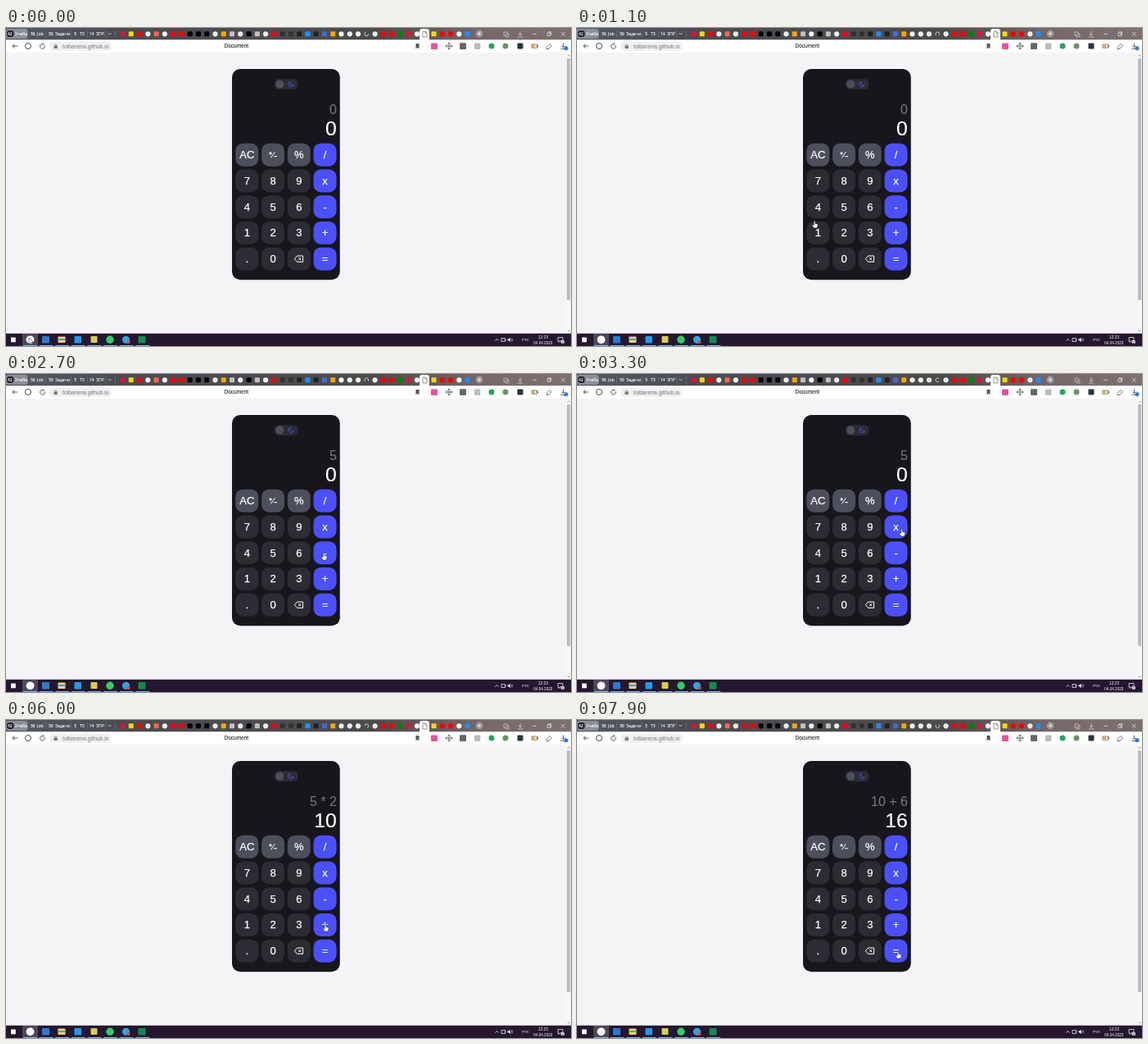
An HTML page with a canvas for the animation above (8 s loop, 690 by 388 pixels).

```html
<!DOCTYPE html>
<html lang="ru">
<head>
<meta charset="utf-8">
<title>Document</title>
<style>
html, body { margin: 0; width: 100%; height: 100%; overflow: hidden; background: #f4f3f6; }
canvas { display: block; width: 690px; height: 388px; }
</style>
</head>
<body>
<canvas id="stage"></canvas>
<script>
const W = 690, H = 388, LOOP = 8000, STEP = 100;
const canvas = document.getElementById('stage');
const ratio = window.devicePixelRatio || 1;
canvas.width = W * ratio;
canvas.height = H * ratio;
const ctx = canvas.getContext('2d');
const ARIAL = '"Liberation Sans", Arial, sans-serif';
const UI = '"Open Sans", "Noto Sans", sans-serif';

const stripFill = ctx.createLinearGradient(0, 0, W, 0);
stripFill.addColorStop(0, '#545966');
stripFill.addColorStop(0.2, '#4b4c52');
stripFill.addColorStop(0.65, '#4d4a4c');
stripFill.addColorStop(0.85, '#77696a');
stripFill.addColorStop(1, '#7d7070');

function box(x, y, w, h, color, r = 0) {
  ctx.fillStyle = color;
  ctx.beginPath();
  ctx.roundRect(x, y, w, h, r);
  ctx.fill();
}

function dot(x, y, r, color) {
  ctx.fillStyle = color;
  ctx.beginPath();
  ctx.arc(x, y, r, 0, Math.PI * 2);
  ctx.fill();
}

function ring(x, y, r, color, from = 0, to = Math.PI * 2, width = 0.8) {
  ctx.strokeStyle = color;
  ctx.lineWidth = width;
  ctx.beginPath();
  ctx.arc(x, y, r, from, to);
  ctx.stroke();
}

function stroke(path, color, width = 0.8) {
  ctx.strokeStyle = color;
  ctx.lineWidth = width;
  ctx.stroke(new Path2D(path));
}

// A thin outline in the same colour gives the text a little more weight.
function text(s, x, y, size, color, align = 'left', font = ARIAL, weight = 0) {
  ctx.font = `${size}px ${font}`;
  ctx.fillStyle = ctx.strokeStyle = color;
  ctx.textAlign = align;
  ctx.fillText(s, x, y);
  if (weight) {
    ctx.lineWidth = weight;
    ctx.strokeText(s, x, y);
  }
}

// Tab strip

const groups = [
  ['42', 2, 'Учеба', 11], ['36', 30, 'Job', 38], ['30', 52, 'Задачи', 60],
  ['3', 83, 'ТЗ', 90], ['14', 102, 'ЗПР', 110]
];
const icons = ('crimson gold red white tomato white red red black black black white ' +
  'orange silver white black silver white red #333 #333 #222 dodgerblue #222 ' +
  'royalblue orange white white white - white red red green crimson white - ' +
  'gold red red white dodgerblue').split(' ');

function drawTabs(t) {
  box(0, 0, W, 14.5, stripFill);
  box(0, 1, 26.5, 12, '#8b8f99', 3);
  for (const x of [48, 79, 99, 121]) box(x, 3, 0.6, 8, '#777b86');
  box(1, 3, 8.5, 8, '#242428', 3);
  for (const [count, cx, name, nx] of groups) {
    text(count, cx, 9, 4.9, '#fff', 'left', UI, 0.15);
    text(name, nx, 9.2, 5.2, '#fff', 'left', UI, 0.1);
  }
  stroke('M124.5 6 l2 2 l2 -2', '#ddd');
  box(133, 3, 0.6, 8, '#777b86');

  box(505, 1, 12, 14, '#fff', [3, 3, 0, 0]);
  icons.forEach((color, i) => {
    const x = 142.5 + i * 10.27;
    if (color === '-') return;
    if (color === 'white') dot(x, 7.3, 3.1, '#f2f2f4');
    else box(x - 3, 4.2, 6, 6, color, 1);
  });
  const turn = t / 800 * Math.PI * 2;
  ring(440.3, 7.3, 2.4, '#eee', turn, turn + 4.5);
  stroke('M509 4 h3 l2 2 v5 h-5 z M512 4 v2 h2', '#555', 0.6);

  dot(578, 7, 4.4, '#a09a9c');
  stroke('M576 7 h4 M578 5 v4', '#fff');
  stroke('M608 5 h4 v4 h-4 z M610 9 v2 h4 v-4 h-2', '#ddd', 0.6);
  stroke('M628 4 v5 M626 7 l2 2 l2 -2 M625 11 h6', '#ddd', 0.7);
  stroke('M643 7.3 h5 M661 6 h3.5 v3.5 h-3.5 z M662.2 6 v-1.2 h3.5 v3.5 h-1.2', '#eee', 0.7);
  stroke('M678 5 l4.6 4.6 M682.6 5 l-4.6 4.6', '#eee', 0.7);
}

function drawAddressBar() {
  box(0, 14.5, W, 15.5, '#fff');
  stroke('M14 22 h-6 M10.5 19.5 l-2.5 2.5 l2.5 2.5', '#444', 0.9);
  ring(27, 22, 3.5, '#444', 0, Math.PI * 2, 1);
  ring(44.5, 22.3, 2.9, '#444', -0.4, 4.9, 0.9);
  stroke('M45.2 18.2 l1 1.5 l-1.8 1', '#444');
  box(53.5, 16.5, 75, 11.5, '#f0f0f2', 4);
  box(58.5, 21.5, 4.4, 3.5, '#777', 0.6);
  ring(60.7, 21.4, 1.4, '#777', Math.PI, Math.PI * 2);
  text('tolbarena.github.io', 69, 24.5, 6.9, '#777');
  text('Document', 281.3, 24.4, 6.5, '#222', 'center', ARIAL, 0.1);

  ctx.fillStyle = '#555';
  ctx.fill(new Path2D('M500.5 19 h4 v6.5 l-2 -1.8 l-2 1.8 z'));
  box(519, 18.5, 8, 7.5, '#ed4f9c', 1);
  stroke('M537 22 h8 M541 18 v8 M538.5 20.5 l-1.7 1.5 l1.7 1.5 M543.5 20.5 l1.7 1.5 ' +
    'l-1.7 1.5 M539.5 19.7 l1.5 -1.7 l1.5 1.7 M539.5 24.3 l1.5 1.7 l1.5 -1.7', '#444', 0.8);
  box(554, 18.3, 8, 7.6, '#666', 1);
  box(572, 18.5, 7.4, 7.4, '#bbb', 1);
  dot(593, 22, 3.5, '#27a558');
  dot(610, 22, 3.5, '#67965c');
  box(624.5, 18.5, 7, 7, '#26343c', 1);
  stroke('M642 20 h6.5 v4.2 h-6.5 z', '#444', 0.7);
  box(642.5, 20.5, 3.5, 3.2, '#e9aa35');
  box(649, 21.2, 1, 1.8, '#444');
  stroke('M660 23.5 l4 -4 l2.3 2.3 l-4 4 z M659.5 25.5 h3', '#555', 0.8);
  stroke('M680.5 18.5 v5 M678.3 21.5 l2.2 2.2 l2.2 -2.2 M677.5 25.5 h5', '#444', 0.8);
  dot(684, 24.7, 2.5, '#2878e8');
}

// Taskbar

function drawTaskbar() {
  box(0, 372.8, W, 15.2, '#25172f');
  box(6, 377.5, 5.8, 5.8, '#fff');
  box(20, 373, 19, 15, '#50465a');
  dot(29.5, 380.3, 4.9, '#fff');
  box(44, 376, 9, 8.5, '#2b7bd3', 1);
  box(63.5, 376.5, 9, 7.5, '#f7d268', 0.8);
  box(63.5, 379, 9, 2, '#4a9bd8');
  box(83.5, 376, 8.5, 8.5, '#229be8', 1);
  box(103.5, 376, 8, 8, '#d9ce57', 1);
  dot(127, 380.3, 4.7, '#34ce64');
  dot(146.5, 380.3, 4.6, '#31a5df');
  dot(149.5, 383, 2.1, '#e44c3c');
  box(161.5, 376, 9, 8.5, '#168a50', 1);
  for (let i = 0; i < 8; i++) box(21 + i * 19.6, 387, 17, 1, '#76b9ed');

  stroke('M597.5 381.5 l2 -2 l2 2', '#fff');
  stroke('M605 378.5 h4.5 v4 h-4.5 z M610 379.5 v2', '#fff', 0.7);
  ctx.fillStyle = '#fff';
  ctx.fill(new Path2D('M612.5 379.5 h1.2 l2 -1.6 v5 l-2 -1.6 h-1.2 z'));
  ring(615.8, 380.4, 1.7, '#fff', -0.9, 0.9, 0.6);
  ring(615.8, 380.4, 3, '#aaa', -0.9, 0.9, 0.6);
  text('РУС', 634.5, 382.4, 4.4, '#fff', 'center');
  text('12:23', 655.8, 379, 4.9, '#fff', 'center');
  text('04.04.2023', 655.8, 386.2, 4.6, '#fff', 'center');
  stroke('M674 377.5 h6 v4.5 h-4 l-1 1.5 v-1.5 h-1 z', '#fff', 0.7);
  dot(679.8, 383, 2.3, '#ddd');
  text('2', 679.8, 384.6, 4, '#222', 'center');
}

// Calculator

const keys = ['AC', '±', '%', '/', '7', '8', '9', 'x', '4', '5', '6', '-',
  '1', '2', '3', '+', '.', '0', '⌫', '='];
const PITCH = 31.75, KEY = 28;

// [start, expression, result]
const states = [
  [0, '0', '0'], [1900, '5', '0'], [3500, '5 *', '0'], [4300, '5 * 2', '0'],
  [5200, '5 * 2', '10'], [6300, '10 +', '10'], [7000, '10 + 6', '10'], [7700, '10 + 6', '16']
];

function drawKey(label, i) {
  const col = i % 4, row = Math.floor(i / 4);
  const x = 280.3 + col * PITCH, y = 140.7 + row * PITCH;
  const color = col === 3 ? '#4b50fb' : row === 0 ? '#4e4f5c' : '#2c2c34';
  box(x, y, KEY, KEY, color, 9);
  const cx = x + KEY / 2, cy = y + KEY / 2;
  if (label === '±') {
    stroke(`M${cx - 5} ${cy - 1.8} h4 m-2 -2 v4 M${cx - 2.6} ${cy + 3.5} l5 -7 ` +
      `M${cx + 1} ${cy + 2} h4`, '#fff', 1);
  } else if (label === '⌫') {
    stroke(`M${cx - 5.4} ${cy} l3.2 -3.7 h7 v7.4 h-7 z ` +
      `M${cx - 0.7} ${cy - 1.6} l3.2 3.2 m0 -3.2 l-3.2 3.2`, '#fff', 1);
  } else {
    text(label, cx, cy + 4.5, 13, '#fff', 'center', ARIAL, 0.25);
  }
}

function drawCalculator(t) {
  box(276, 50, 131.8, 257.2, '#17161c', 10);
  box(328, 62.2, 28.3, 12.8, '#2c2c34', 5);
  dot(334.3, 68.6, 5, '#4e4f5c');
  stroke('M347 65.3 a3.3 3.3 0 1 0 4.2 4.3 a3.4 3.4 0 0 1 -4.2 -4.3 z', '#4b50fb', 0.9);
  const [, expr, result] = states.filter(s => s[0] <= t).pop();
  text(expr, 404, 105.3, 16, '#737277', 'right', ARIAL, 0.15);
  text(result, 403.8, 131.4, 24.8, '#fff', 'right', ARIAL, 0.2);
  keys.forEach(drawKey);
}

// Pointer: [time, x, y] of the tip

const path = [
  [0, 28, 378], [200, 28, 378], [1000, 290, 235], [1200, 290, 235], [1800, 327, 220],
  [2200, 327, 220], [2700, 388, 218], [2900, 388, 218], [3300, 396.5, 189],
  [3600, 396.5, 189], [4200, 329, 252], [4700, 329, 252], [5100, 391, 283],
  [5500, 391, 283], [5900, 390, 249], [6400, 390, 249], [6900, 359, 219],
  [7200, 359, 219], [7600, 392, 282], [LOOP, 392, 282]
];

function pointerAt(t) {
  const i = path.findIndex(p => p[0] > t);
  const [t0, x0, y0] = path[i - 1], [t1, x1, y1] = path[i];
  const k = (t - t0) / (t1 - t0), e = k * k * (3 - 2 * k);
  return [x0 + (x1 - x0) * e, y0 + (y1 - y0) * e];
}

function overKey(x, y) {
  const dx = x - 280.3, dy = y - 140.7;
  return dx >= 0 && dy >= 0 && dx < 4 * PITCH && dy < 5 * PITCH;
}

const hand = new Path2D('M-.8 .6 q.8 -1 1.6 0 v2.8 l2.6 .7 q.8 .3 .7 1.2 l-.5 2.7 l-.7 1 ' +
  'h-3.6 l-2.3 -3.2 q0 -1 1 -.8 l1.2 .8 z');
const arrow = new Path2D('M0 0 v7.6 l1.8 -1.6 l1.2 2.6 l1.2 -.6 l-1.2 -2.5 h2.4 z');

function drawPointer(t) {
  const [x, y] = pointerAt(t);
  const shape = overKey(x, y) ? hand : arrow;
  ctx.save();
  ctx.translate(x, y);
  ctx.fillStyle = '#fff';
  ctx.fill(shape);
  ctx.strokeStyle = '#111';
  ctx.lineWidth = 0.5;
  ctx.stroke(shape);
  ctx.restore();
}

function draw(now) {
  const t = Math.floor((now % LOOP) / STEP) * STEP;
  ctx.setTransform(ratio, 0, 0, ratio, 0, 0);
  ctx.lineJoin = 'round';
  box(0, 0, W, H, '#f4f3f6');
  drawTabs(t);
  drawAddressBar();
  box(684.5, 30, 5.5, 343, '#f7f7f8');
  box(685, 37, 4.2, 295, '#bdbdc0', 1);
  stroke('M685.8 34.5 l1.4 -1.6 l1.4 1.6 M685.8 368.5 l1.4 1.6 l1.4 -1.6', '#777', 0.7);
  drawCalculator(t);
  drawTaskbar();
  drawPointer(t);
}

const start = performance.now();
function tick() {
  draw(performance.now() - start);
  requestAnimationFrame(tick);
}
tick();
</script>
</body>
</html>
```
